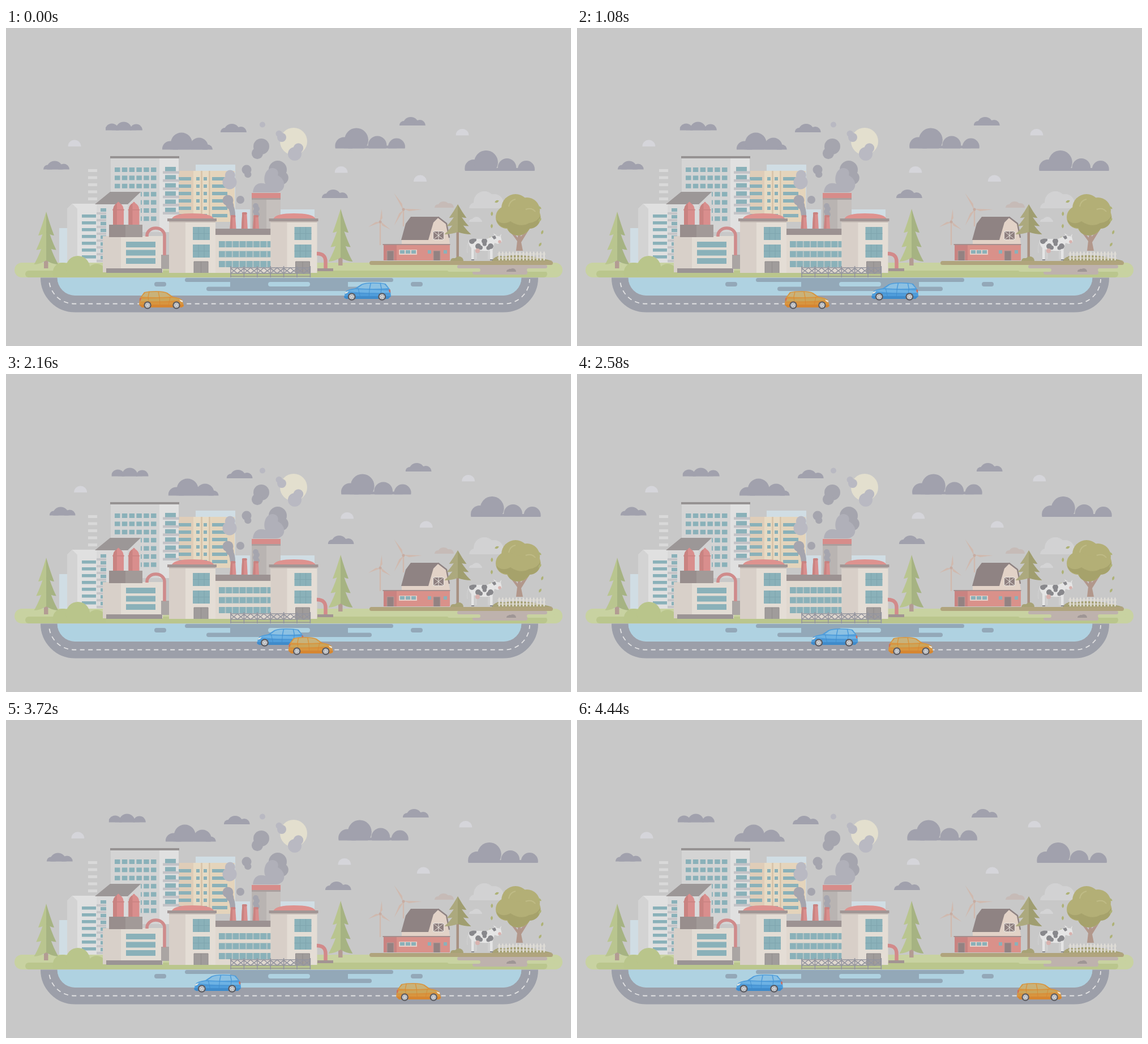
Recreate the animation shown at these times as an HTML page with a canvas. Size 998 by 561 pixels, loop 4510 ms.

```html
<!DOCTYPE html>
<html lang="en">
<head>
<meta charset="utf-8">
<title>City and farm</title>
<style>
html, body { margin: 0; width: 100%; height: 100%; overflow: hidden; background: #c8c8c8; }
canvas { display: block; }
</style>
</head>
<body>
<canvas id="stage" width="998" height="561"></canvas>
<script>
const c = document.getElementById('stage').getContext('2d');
const LOOP = 4510, STEP = 30, LAST = 4440, TURN = 2400;
const TEAL = '#8ab1b9', RED = '#d98e8d', DARK_RED = '#c98381', SKY = '#d0dde4', STEEL = '#94959f';
const SMOKE = '#a5a5ae', PALE_SMOKE = '#b9b9c2', DEEP = '#93a8b8', LAKE = '#afd2e1';
const GRASS = '#c8d2a1', MEADOW = '#bac68d', SOIL = '#b0a47d', MUD = '#beb2ad';

// Shape helpers
function path(color, d) { c.fillStyle = color; c.fill(new Path2D(d)); }
function line(color, width, d) { c.strokeStyle = color; c.lineWidth = width; c.stroke(new Path2D(d)); }
function rect(color, x, y, w, h) { c.fillStyle = color; c.fillRect(x, y, w, h); }
function disc(color, x, y, r) { c.fillStyle = color; c.beginPath(); c.arc(x, y, r, 0, 7); c.fill(); }
function pill(color, x, y, w, h) { c.fillStyle = color; c.beginPath(); c.roundRect(x, y, w, h, h / 2); c.fill(); }
function at(x, y, draw, sx = 1, sy = 1, angle = 0) {
  c.save(); c.translate(x, y); c.rotate(angle); c.scale(sx, sy); draw(); c.restore();
}
function grid(color, x, y, cols, rows, w, h, dx, dy) {
  for (let i = 0; i < cols; i++)
    for (let j = 0; j < rows; j++) rect(color, x + i * dx, y + j * dy, w, h);
}
// Building with a shaded left side
function block(x, y, w, h, side, dark, light) {
  rect(light, x, y, w, h);
  rect(dark, x, y, side, h);
}
function seeded(seed) {
  return () => (seed = seed * 16807 % 2147483647) / 2147483647;
}

// Bumps are [x, height]; each one is a circle cut at the flat base
function cloud(x, base, bumps, color = '#a1a1ad') {
  at(x, base, () => {
    c.beginPath(); c.rect(0, -60, 150, 60); c.clip();
    const first = bumps[0][0], last = bumps[bumps.length - 1][0];
    rect(color, first, -5, last - first, 5);
    for (const [bx, h] of bumps) {
      const r = Math.min(h, 9 + h / 3);
      disc(color, bx, r - h, r);
    }
  });
}
const SMALL = [[8, 8], [20, 15], [36, 10]];
const MEDIUM = [[11, 12], [32, 15], [54, 11]];
const LARGE = [[14, 15], [34, 30], [65, 21], [80, 9]];
const WIDE = [[16, 20], [38, 36], [75, 22], [109, 18]];

function clouds() {
  for (const [x, y] of [[66, 249.5], [379, 184], [558, 300], [695, 172]]) cloud(x, y, SMALL);
  for (const [x, y] of [[109.5, 209], [580.5, 255.5], [720, 271], [794.5, 189.5]])
    cloud(x, y, [[11.5, 11.5]], '#d5d5da');
  for (const [x, y] of [[581, 212.5], [810, 252]]) cloud(x, y, WIDE);
  cloud(176, 180.5, MEDIUM);
  cloud(276, 214.5, LARGE);
}

function city() {
  grid('#d9d9d9', 145, 249, 1, 5, 16, 5, 0, 12.5);
  rect(SKY, 94, 353, 15, 62);
  rect(SKY, 335, 241, 70, 100);
  rect(SKY, 404, 320, 27, 40);
  rect(SKY, 485, 320, 60, 20);

  path('#e0e0e0', 'M108 319L117 310H160V414H108Z');
  path('#d3d3d3', 'M108 319L117 310L126 319V414H108Z');
  grid(TEAL, 134, 329, 1, 7, 25, 5.5, 0, 12);

  block(185.5, 230, 119.5, 130, 85.5, '#d4d4d4', '#e0e0e0');
  rect('#969292', 184, 226, 122, 4);
  grid(TEAL, 192, 246, 6, 7, 9.5, 8, 12.8, 14.4);
  block(305, 252, 57, 90, 26, '#dfcdb8', '#e7dac3');
  rect('#e4d4bb', 362, 252, 42, 90);
  for (const [x, w] of [[305, 22], [336, 6], [349, 6], [364, 27]])
    grid(TEAL, x, 263, 1, 6, w, 6, 0, 13);
  grid('#d8c5ab', 344, 252, 2, 1, 3, 90, 14, 0);
  grid(TEAL, 281, 245, 1, 6, 19, 8, 0, 14.4);
  grid('#c3c3c7', 277, 252.5, 1, 6, 29, 4.5, 0, 14.4);

  path('#d2d2d2', 'M160 310H215L238 289V414H160Z');
  rect('#dadada', 160, 310, 55, 104);
  grid(TEAL, 167, 318, 1, 8, 10, 6, 0, 12);
  grid('#c5c5c8', 160, 325, 1, 8, 17, 4, 0, 12);
  path('#9c9797', 'M157 311L184 289H238L215 311Z');

  block(434, 301, 51, 53, 26, '#b9b4b2', '#c5c0bd');
  rect('#d78c8a', 434, 291, 51, 9);
  rect('#a99f9e', 434, 300, 51, 3);
}

// A round puff with a smaller one at the given angle
function puff(x, y, r, angle, color = SMOKE) {
  disc(color, x, y, r);
  disc(color, x + Math.cos(angle) * r, y + Math.sin(angle) * r, r * .72);
}
function smoke() {
  disc('#e3dfce', 508, 200, 24);
  disc(PALE_SMOKE, 453, 170.5, 5);
  puff(487, 193, 8, -2.2, PALE_SMOKE);
  puff(510, 222, 12, -1, PALE_SMOKE);
  puff(451, 209, 14, 2.1);
  puff(425, 250, 8.5, 1.3);
  puff(480, 250, 16, 1.1);
  path('#b0b0b9', 'M436 290C437 277 446 271 458 275C453 262 460 246 472 247C482 249 481 257 480 260C495 267 496 288 478 290Z');
  puff(395, 272, 12.5, -1.5, PALE_SMOKE);
  disc(SMOKE, 414, 303, 7);
  puff(392, 304, 9.5, 1.2);
  path(SMOKE, 'M388 312Q395 318 396 331H405Q405 317 400 311Z');
  for (let i = 0; i < 4; i++) disc(SMOKE, 441 + (i % 2) * 2, 314 + i * 5, 5);
}

function stack(x, y) {
  path(RED, `M${x + 1} ${y}h8L${x + 10.5} 354h-11Z`);
  path(DARK_RED, `M${x + 1} ${y}h3V354h-4.5Z`);
  pill(DARK_RED, x + .5, y - 1, 9, 4);
}
function silo(x) {
  at(x, 306, () => {
    path(RED, 'M0 42V15Q1 6 7 3Q9.5-2 12 3Q18 6 19 15V42Z');
    path(DARK_RED, 'M0 42V15Q1 6 7 3V42Z');
    rect(DARK_RED, -1, 14, 21, 1.5);
  });
}
function pane(x, y, w, h, color, frame, d) {
  rect(color, x, y, w, h);
  at(x, y, () => line(frame, 1, d));
}
function tower(x) {
  at(x, 336, () => {
    block(0, 5, 82, 91, 29, '#d8cfc8', '#e4ddd5');
    rect('#c5bbb5', 0, 5, 82, 2);
    path('#de928f', 'M5 0Q10-9 41-9Q74-9 79 0Z');
    rect('#a19695', -3, 0, 87, 5);
    for (const y of [15, 46]) pane(42, y, 30, 23, TEAL, '#7fa5ae', 'M0 11.500h30M10 0v23M20 0v23');
    pane(44, 76, 25, 20, '#a09c9b', '#8f8b8b', 'M0 20V0H25V20M12.500 0v20');
  });
}
function factory() {
  block(171, 367, 106, 64, 32, '#d8d0c9', '#e2dcd4');
  rect('#9b9495', 177, 424, 99, 8);
  rect('#aaa5a3', 274, 400, 14, 25);
  silo(189);
  silo(216.5);
  block(182, 347, 59, 22, 29, '#988e8d', '#a29a98');
  grid(TEAL, 212, 377, 1, 3, 52, 10, 0, 14.5);
  line('#cf8b8b', 5.5, 'M249 368V366A15.500 13 0 0 1 280 366V401');

  for (let i = 0; i < 3; i++) stack(396 + i * 20.3, i === 1 ? 326 : 331);
  rect('#e0d8cf', 370, 365, 113, 67);
  rect('#9c9292', 370, 354, 112.5, 11);
  grid(TEAL, 376, 376, 1, 3, 97, 11, 0, 17.5);
  grid('#b6c5c6', 386.6, 376, 7, 3, 2, 11, 12.2, 17.5);
  tower(288);
  tower(467.5);
  rect('#a29493', 550, 424, 28, 5);
  line('#d28a8a', 6.5, 'M549 398Q565 398 564.500 413V424');
}

// Three overlapping tiers, light on the left and dark on the right
function pine(x, y, light = '#b9c58f', dark = '#a6b382', sx = 1, sy = 1) {
  at(x, y, () => {
    for (let i = 2; i >= 0; i--) {
      const top = 20 * i, foot = 42 + 25.5 * i, half = 14 + 3.7 * i;
      for (const side of [-half, half])
        path(side < 0 ? light : dark, `M0 ${top}Q${side * .5} ${foot - 18} ${side} ${foot}Q${side * .5} ${foot} 0 ${foot - 7}Z`);
    }
  }, sx, sy);
}

function ground() {
  pill(GRASS, 15, 414, 968, 26);
  for (const [x, y] of [[71, 324], [591, 319]]) {
    rect('#b39c93', x - 4, y + 80, 7.5, 20);
    pine(x, y);
  }
  pill(MEADOW, 34, 428, 922, 12);
  cloud(82, 439, [[18, 25], [45, 37], [78, 23]], '#b9c58b');
}

function water() {
  line('#9c9fa9', 30, 'M76 440.500A46 46 0 0 0 122 486.500H879A46 46 0 0 0 925 440.500');
  path(LAKE, 'M90.500 440.500H910.500A31.500 31.500 0 0 1 879 472H122A31.500 31.500 0 0 1 90.500 440.500Z');
  rect(DEEP, 396, 441, 208, 22);
  pill(DEEP, 316, 441, 368, 7);
  pill(DEEP, 354, 456.5, 292, 7.5);
  pill(LAKE, 463, 448, 74, 8);
  for (const x of [262, 715]) pill(DEEP, x, 448, 21, 8);
  c.setLineDash([8, 6.5]);
  c.lineDashOffset = -6.5;
  line('#e2e2e3', 1.8, 'M76 443A45 44 0 0 0 122 486.500H879A45 44 0 0 0 925 443');
  c.setLineDash([]);
}

function bridge() {
  line(STEEL, 1.6, 'M396 423H538M396 433H538M396 438H538');
  for (let i = 0; i <= 6; i++)
    at(397 + i * 23.4, 420, () => line(STEEL, 1.6, i < 6 ? 'M0 0V20M0 13L11.700 3L23.400 13M0 4L11.700 13L23.400 4' : 'M0 0V20'));
}

function windmill(x, y, r, angle, foot) {
  const color = '#d0b9ae';
  rect(color, x - 1.2, y, 2.4, foot - y);
  for (let i = 0; i < 3; i++)
    at(x, y, () => path(color, `M0-1L${r * .3} 3L${r} 0Z`), 1, 1, angle + i * Math.PI * 2 / 3);
  disc('#c7aca2', x, y, 2.5);
}
function barn() {
  windmill(661, 342, 23, -1.45, 383);
  windmill(702, 320, 33, 0, 350);
  block(667, 382, 117, 28, 23, DARK_RED, '#d9918a');
  path('#e2d2c7', 'M699 381V373H745L753 345L764 334L779 345L784 381Z');
  path('#8f8383', 'M698 374L706 345L715 333H765L755 343L746 374Z');
  line('#8f8383', 2.5, 'M763 333.500L778 345L783 370');
  rect('#a58e8d', 665.5, 381, 119, 2);
  pane(754, 358, 20, 16, '#8f8080', '#e8e2dc', 'M.5.5h19v15h-19zl19 15m0-15l-19 15M10 0v16');
  rect('#e5cfc8', 694, 391, 32, 9);
  grid(TEAL, 696, 392, 3, 1, 8, 6, 10, 0);
  grid(TEAL, 745, 392, 2, 1, 6, 6, 28, 0);
  for (const x of [673, 755]) pane(x, 393, 12, 17, '#938282', '#b59a97', 'M0 17V0h12v17');
}

function farmTrees() {
  cloud(814, 318, [[14, 10], [31, 30], [48, 25]], '#d2d2d3');
  cloud(817, 342, [[6, 5], [14, 9], [20, 4]], '#d4d4d5');
  cloud(756, 317, [[7, 6], [17, 11], [27, 8]], '#c6bbb7');

  rect('#a89182', 795.5, 350, 4.5, 61);
  pine(798, 311, '#aca97e', '#a09e70', 1.1, .57);

  path('#b2978b', 'M901 393L903 376L889 357H893L904 370V350H909V368L920 357H923L910 378L913 393Z');
  const crown = '#b3af76';
  disc(crown, 900, 318, 25);
  disc(crown, 920, 322, 23);
  disc(crown, 885, 334, 20);
  disc(crown, 925, 334, 19.5);
  disc(crown, 905, 343, 23);
  path('#a6a26b', 'M866 338Q876 349 891 341Q909 353 924 344Q938 343 944 331Q943 353 925 354Q914 369 898 365Q888 363 886 353Q870 352 866 338Z');
  line('#bfbb86', 2, 'M888 315Q890 304 900 302M918 320Q929 316 935 324');
  const random = seeded(7);
  for (let i = 0; i < 8; i++) {
    const side = i % 2 ? 1 : -1, fall = i / 7;
    at(903 + side * (36 + random() * 12), 306 + fall * 76, () =>
      path('#aeb276', 'M-4 0Q0-4 4 0Q0 4-4 0Z'), 1, 1, random() * 3);
  }
}

function cow() {
  at(812, 364, () => {
    const white = '#e5e5e5', spot = '#88888c';
    line('#cfcfcf', 1.5, 'M6 11Q1 21 3 33');
    for (const x of [16, 39]) rect('#cfcfcf', x, 22, 4, 22);
    for (const x of [10, 43]) {
      rect(white, x, 22, 4.5, 22);
      rect(spot, x, 44, 5, 2);
    }
    c.save();
    const body = 'M5 11Q10 6 20 8H38L50 2L62 4L64 13L57 17L51 15L47 28Q32 31 13 26Q5 22 5 11Z';
    path(white, body);
    c.clip(new Path2D(body));
    for (let i = 0; i < 4; i++) puff(11 + i * 11, 12 + (i % 2) * 9, 5, -.5 + i, spot);
    c.restore();
    path(spot, 'M46 4L52 2L54 7L50 9Z');
    disc('#d8b2ae', 60, 13, 2.8);
    disc('#d8b2ae', 21, 29, 4);
    path(white, 'M51 2L49-2L55 2ZM60 3L63-1L62 4Z');
  });
}

function farm() {
  barn();
  farmTrees();
  cloud(782, 411, [[8, 5], [18, 8]], '#a7a276');
  path('#a7a276', 'M858 411Q864 400 880 403Q910 396 965 411Z');
  cow();
  for (let x = 870; x < 953; x += 6.1) path('#e3e0da', `M${x} 410V396l1.200-2.500l1.200 2.500V410Z`);
  grid('#dedbd4', 868, 398, 1, 2, 85, 1.5, 0, 7);
  pill(SOIL, 642, 411, 324, 7);
  pill(MUD, 797, 418, 159, 6);
  rect(MUD, 830, 421, 105, 9);
  pill(MUD, 824, 428, 97, 7);
  pill(GRASS, 780, 424, 58, 6);
  pill(GRASS, 920, 424, 50, 6);
  cloud(879, 430, [[9, 4], [16, 6]], '#9f9695');
}

function wheel(x, y, r) {
  disc('#5a5a60', x, y, r);
  disc('#d0d2d5', x, y, r * .68);
  for (let a = 0; a < 6; a += Math.PI * .4)
    disc('#85878c', x + Math.cos(a) * r * .4, y + Math.sin(a) * r * .4, .8);
}
// Estate car, 79 wide, facing right
function car({ body, shade, glass, shine }) {
  path(body, 'M0 25L1 14L9 3Q16 1 30 1Q44 1 50 4L60 11Q74 13 77 18L79 28L75 30H5Z');
  path(glass, 'M5 11L11 4Q18 2.500 30 2.500Q43 2.500 48 5L56 11Q30 13 5 11Z');
  path(shine, 'M2 15Q30 14 60 13L75 16Q50 20 2 20Z');
  path(shade, 'M0 25H79L78 28L75 30H5Z');
  line(body, 1.5, 'M18 2L16 12M34 2L36 12');
  line(shade, .8, 'M16 12L18 26M36 12L37 26M55 12L52 26M2 20H62');
  path('#ece8de', 'M71 16L77 18V21L73 19Z');
  path('#cf6d5a', 'M1 14L4 13L3 18L1 19Z');
  wheel(15, 26, 6.7);
  wheel(66, 26, 6.7);
}
const ORANGE = { body: '#d8953f', shade: '#d68632', glass: '#c9b27a', shine: '#cba55a' };
const BLUE = { body: '#4f9ddb', shade: '#3f8bcb', glass: '#8cc1e3', shine: '#6db2e4' };

function draw(t) {
  rect('#c8c8c8', 0, 0, 998, 561);
  // Clouds drift right, turn softly, and drift back
  const drift = 10.9 - .0056 * (Math.hypot(t - TURN, 500) - 500);
  at(drift, 0, clouds);
  city();
  smoke();
  ground();
  factory();
  farm();
  water();
  bridge();
  at(680 - .0712 * t, 448, () => car(BLUE), -1.05, 1);
  at(235 + .1221 * t, 463, () => car(ORANGE));
}

function frame() {
  const t = performance.now() % LOOP;
  draw(Math.min(Math.floor(t / STEP) * STEP, LAST));
  requestAnimationFrame(frame);
}
frame();
</script>
</body>
</html>
```
